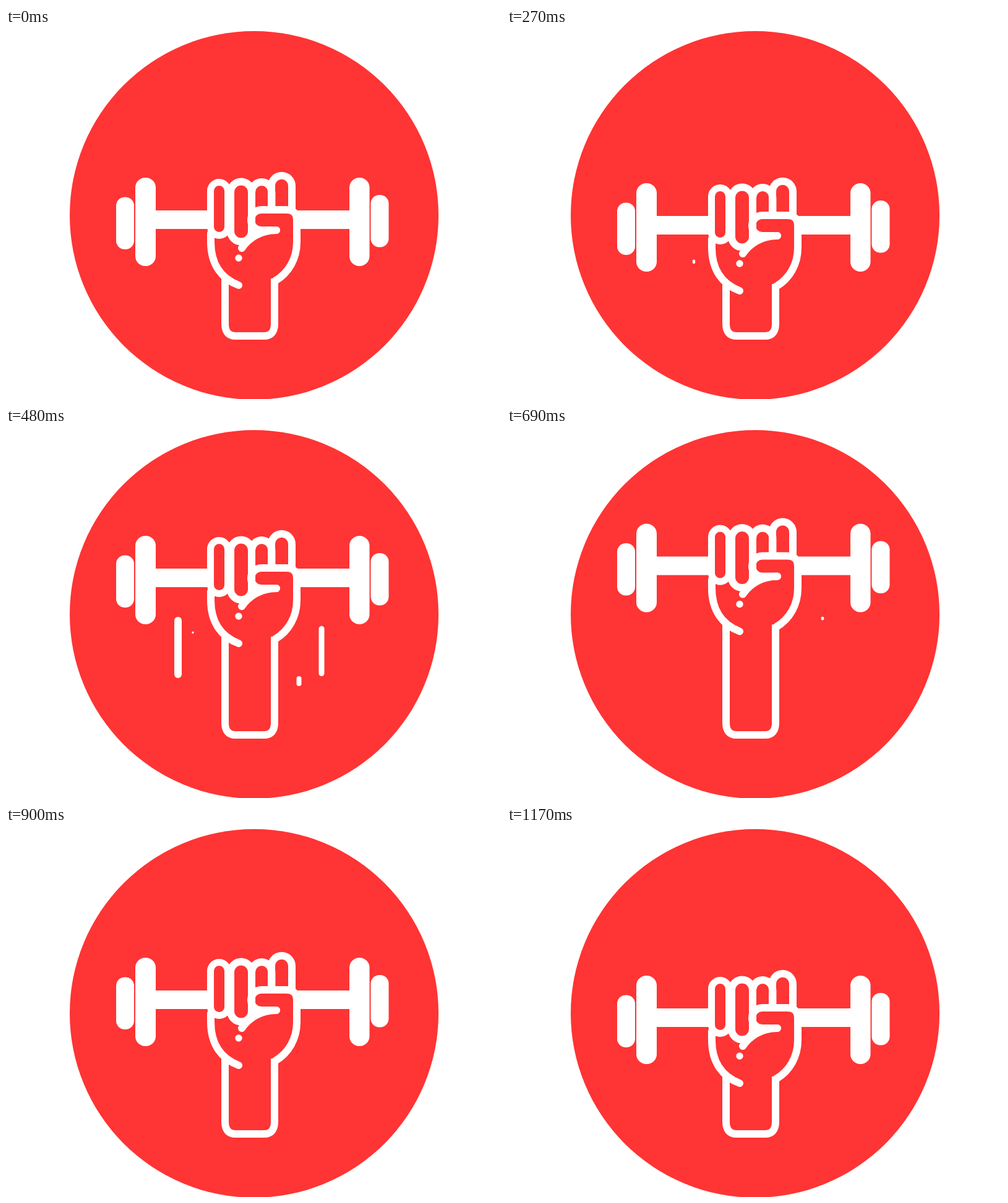
Write an HTML page that moves like this. It is 800x600 px and loops after 4840 ms.

```html
<!DOCTYPE html>
<html lang="en">
<head>
<meta charset="utf-8">
<title>Dumbbell lift</title>
<style>
  html, body { margin: 0; width: 100%; height: 100%; overflow: hidden; background: #fff; }
  svg { display: block; width: 800px; height: 600px; }
  .line { fill: none; stroke: #fff; stroke-width: 12; }
  .round { stroke-linecap: round; stroke-linejoin: round; }
</style>
</head>
<body>
<svg viewBox="0 0 800 600">
  <circle cx="401" cy="303" r="298" fill="#ff3434"/>
  <g id="streaks" class="line round"></g>
  <path id="arm" class="line"/>
  <g id="lift">
    <g fill="#fff">
      <rect x="178" y="273.5" width="29" height="84.5" rx="14"/>
      <rect x="209" y="242" width="33" height="143" rx="16"/>
      <rect x="241" y="295" width="90" height="30"/>
      <rect x="470" y="295" width="86" height="30"/>
      <rect x="555" y="242" width="32.5" height="143" rx="16"/>
      <rect x="589.5" y="270" width="29" height="84.5" rx="14"/>
      <circle cx="376" cy="372" r="5.7"/>
    </g>
    <g class="line">
      <rect x="330.5" y="249.5" width="28" height="86" rx="14" stroke-width="11"/>
      <rect x="363" y="248.5" width="34" height="97" rx="17"/>
      <path d="M397 295V265.5a16.2 16.5 0 0 1 32.4 0V295"/>
      <path d="M429 295V255.5a16.5 16.8 0 0 1 33 0V295"/>
    </g>
    <g class="line round">
      <path d="M331 332V346C331 384 350 406 376 416"/>
      <path d="M437 327H412.5a16.5 16.5 0 0 1 0 -33H453Q470 294 470 311V346C470 373 457 396 435 409"/>
      <path d="M437 327C411 327 392 340 381 356"/>
    </g>
  </g>
</svg>
<script>
const LOOP = 4840, STEP = 30;

// time, height offset, speed
const keys = [
  [0, 0, 0], [150, 30, 0], [270, 9, -.33], [480, -66, -.27],
  [540, -74, -.1], [660, -86, 0], [690, -85.5, .04],
  [900, -29, .44], [1020, 24, .36], [1060, 30, 0], [1170, 0, 0]
];

const streaks = [
  { x: 302, w: 7, from: 379, to: 332, head: [250, 400], tail: [340, 490] },
  { x: 278, w: 12, from: 454, to: 313, head: [300, 480], tail: [400, 590] },
  { x: 473.5, w: 8, from: 456, to: 407, head: [290, 430], tail: [350, 525] },
  { x: 510, w: 9, from: 420, to: 309, head: [330, 530], tail: [390, 710] }
];

const lift = document.getElementById("lift");
const arm = document.getElementById("arm");
const group = document.getElementById("streaks");

for (const s of streaks) {
  s.el = document.createElementNS("http://www.w3.org/2000/svg", "path");
  group.append(s.el);
}

function ease(t, [a, b]) {
  const u = Math.min(1, Math.max(0, (t - a) / (b - a)));
  return u * u * (3 - 2 * u);
}

function offset(t) {
  const i = keys.findIndex(k => k[0] > t);
  if (i < 0) return 0;
  const [t0, y0, v0] = keys[i - 1], [t1, y1, v1] = keys[i];
  const d = t1 - t0, u = (t - t0) / d, s = u * u * (3 - 2 * u);
  return y0 + (y1 - y0) * s + d * u * (1 - u) * (v0 * (1 - u) - v1 * u);
}

function drawStreak(s, t) {
  const at = span => s.from + (s.to - s.from) * ease(t, span);
  const top = at(s.head), bottom = at(s.tail), len = bottom - top;
  s.el.style.display = len > .1 ? "" : "none";
  s.el.setAttribute("d", `M${s.x} ${top}V${bottom}`);
  s.el.setAttribute("stroke-width", s.w * Math.min(1, .4 + len / 10));
}

function draw(t) {
  const y = offset(t), wrist = 405 + y;
  lift.setAttribute("transform", `translate(0 ${y})`);
  arm.setAttribute("d", `M354 ${wrist}V478Q354 498 371 498H417Q434 498 434 478V${wrist}`);
  for (const s of streaks) drawStreak(s, t);
}

const start = performance.now();
function tick() {
  const t = (performance.now() - start) % LOOP;
  draw(Math.floor(t / STEP) * STEP);
  requestAnimationFrame(tick);
}
draw(0);
requestAnimationFrame(tick);
</script>
</body>
</html>
```
